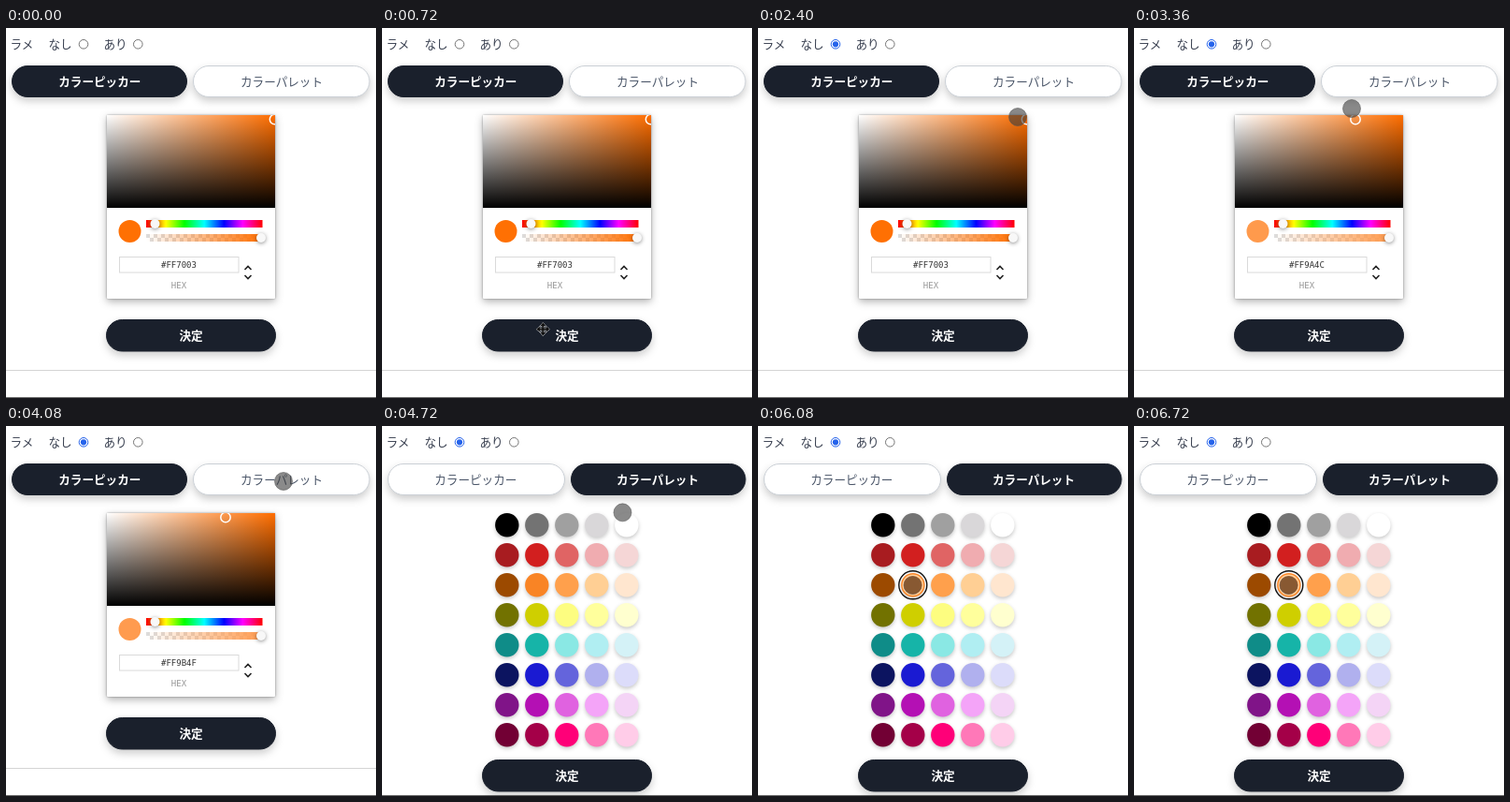
An HTML page that plays this animation: 396 px wide and 395 px high, repeating every 6.8 s.

```html
<!DOCTYPE html>
<html lang="ja">
<head>
<meta charset="utf-8">
<style>
html, body { margin: 0; width: 100%; height: 100%; overflow: hidden; background: #fff; }
svg { display: block; width: 396px; height: 395px; }
text { font: 12.6px "Noto Sans CJK JP", "Noto Sans CJK", sans-serif; fill: #3b4252; }
.mid { text-anchor: middle; }
.pill { filter: drop-shadow(0 4px 4px rgba(0,0,0,.2)); }
.pill rect { fill: #fff; stroke: #cbd0d6; }
.pill text { fill: #4a5568; }
.pill.on rect { fill: #1a202c; stroke: #1a202c; }
.pill.on text { fill: #fff; font-weight: 700; }
.radio { fill: #fff; stroke: #767676; }
.mono { font: 9px "DejaVu Sans Mono", monospace; fill: #333; }
.knob { fill: #f8f8f8; filter: drop-shadow(0 1px 2px rgba(0,0,0,.45)); }
.swatch { filter: drop-shadow(0 2px 2px rgba(0,0,0,.22)); }
</style>
</head>
<body>
<svg viewBox="0 0 396 395">
  <defs>
    <linearGradient id="white"><stop stop-color="#fff"/><stop offset="1" stop-color="#fff" stop-opacity="0"/></linearGradient>
    <linearGradient id="black" x2="0" y2="1"><stop stop-opacity="0"/><stop offset="1"/></linearGradient>
    <linearGradient id="hue">
      <stop stop-color="#f00"/><stop offset=".17" stop-color="#ff0"/><stop offset=".33" stop-color="#0f0"/>
      <stop offset=".5" stop-color="#0ff"/><stop offset=".67" stop-color="#00f"/><stop offset=".83" stop-color="#f0f"/>
      <stop offset="1" stop-color="#f00"/>
    </linearGradient>
    <linearGradient id="alpha"><stop class="tint" stop-opacity="0"/><stop class="tint" offset="1"/></linearGradient>
    <pattern id="checks" x="150" y="220" width="8" height="8" patternUnits="userSpaceOnUse">
      <path fill="#fff" d="M0 0h8v8H0z"/><path fill="#ddd" d="M0 0h4v4H0zM4 4h4v4H4z"/>
    </pattern>
    <clipPath id="field"><rect x="108" y="93" width="180" height="99"/></clipPath>
  </defs>

  <path d="M0 394.5H396" stroke="#6b6b6b"/>
  <text x="4.5" y="22">ラメ</text>
  <text x="45.5" y="22">なし</text>
  <text x="104.5" y="22">あり</text>
  <circle id="none" class="radio" cx="83" cy="17.3" r="4.8"/>
  <circle id="noneDot" cx="83" cy="17.3" r="3.1" fill="#2563eb"/>
  <circle class="radio" cx="141.3" cy="17.3" r="4.8"/>

  <g id="tabPicker" class="pill"><rect x="6.5" y="40.5" width="187" height="33" rx="16.5"/><text class="mid" x="100.3" y="61.5">カラーピッカー</text></g>
  <g id="tabPalette" class="pill"><rect x="200.5" y="40.5" width="188.5" height="33" rx="16.5"/><text class="mid" x="295" y="61.5">カラーパレット</text></g>

  <g id="picker">
    <path d="M0 365.5H396" stroke="#d4d4d4"/>
    <rect x="108" y="93" width="180" height="196" rx="1" fill="#fff" style="filter:drop-shadow(0 0 1px rgba(0,0,0,.35)) drop-shadow(0 3px 4px rgba(0,0,0,.3))"/>
    <g clip-path="url(#field)">
      <rect x="108" y="93" width="180" height="99" fill="#ff6e00"/>
      <rect x="108" y="93" width="180" height="99" fill="url(#white)"/>
      <rect x="108" y="93" width="180" height="99" fill="url(#black)"/>
      <circle id="handle" cy="97.5" r="5.2" fill="none" stroke="#fff" stroke-width="1.5"/>
    </g>
    <circle class="tint" cx="132.5" cy="217" r="12"/>
    <rect x="150" y="205" width="124.5" height="8" fill="url(#hue)"/>
    <circle class="knob" cx="159.5" cy="209" r="5"/>
    <rect x="150" y="220" width="124.5" height="8" fill="url(#checks)"/>
    <rect x="150" y="220" width="124.5" height="8" fill="url(#alpha)"/>
    <circle class="knob" cx="273" cy="224" r="5"/>
    <rect x="121.5" y="244.5" width="127.5" height="16.5" fill="#fff" stroke="#dadada"/>
    <text id="hex" class="mono mid" x="185" y="256"></text>
    <text class="mono mid" x="185" y="278" style="fill:#969696">HEX</text>
    <path d="M255.5 258l3.5-3.5 3.5 3.5M255.5 264l3.5 3.5 3.5-3.5" fill="none" stroke="#222" stroke-width="1.6"/>
  </g>

  <g id="palette"></g>
  <g id="ok" class="pill on"><rect x="107.5" y="311.5" width="181" height="33.5" rx="16.75"/><text class="mid" x="198" y="333">決定</text></g>

  <circle id="touch" r="9.5" fill="#3c3c3c" fill-opacity=".6" stroke="#555" stroke-opacity=".55"/>
  <path id="cross" d="M0-7l3 3.5H1V-1H3.500V-3L7 0 3.500 3V1H1V3.500H3L0 7-3 3.500H-1V1H-3.500V3L-7 0-3.500-3V-1H-1V-3.500H-3z" fill="#111" stroke="#fff" stroke-width=".8" paint-order="stroke"/>
</svg>
<script>
const LOOP = 6800, STEP = 80;
const CHECK = 1680, SWITCH = 4240, HOVER = 5280, SELECT = 5840;
const $ = id => document.getElementById(id);
const tints = document.querySelectorAll('.tint');

const rows = [
  '#000 #737373 #a0a0a0 #d9d7d9 #fff',
  '#a81c20 #d21f1f #e06464 #f0acb0 #f5d6d6',
  '#9c4a00 #f98425 #ffa04c #ffcf94 #ffe6cf',
  '#727200 #cfcf00 #fdfd80 #ffff9c #ffffcf',
  '#0f8c88 #16b4a8 #8ae8e4 #b0eef2 #d4f2f7',
  '#0c1460 #1a1ad2 #6464dc #b0b0ee #dcdcfa',
  '#801488 #b410b4 #e062e0 #f4a4f8 #f4d4f6',
  '#720034 #a40048 #ff0078 #ff78b8 #ffcce8'
];
const ring = (id, r, color) =>
  `<circle id="${id}" cx="165.800" cy="169.800" r="${r}" fill="none" stroke="${color}" stroke-width="1.4"/>`;
$('palette').innerHTML = rows.map((row, j) => row.split(' ').map((color, i) =>
  `<circle class="swatch" cx="${133.8 + i * 32}" cy="${105.8 + j * 32}" r="12.7" fill="${color}"/>`
).join('')).join('') + ring('hover', 10.6, '#ffd2a0') + ring('chosen', 15, '#111');

// [time, x, y]
const pointer = [
  [480, 198, 405], [1280, 79, 19], [1760, 79, 19], [2400, 278, 95], [2560, 287, 93],
  [2720, 287, 92], [3360, 233, 86], [3600, 231, 86], [4000, 297, 59], [4400, 297, 59],
  [5280, 165.5, 170], [LOOP, 165.5, 170]
];
const drag = [[0, 287.5], [2720, 287.5], [3360, 237], [3520, 235], [LOOP, 235]];
const ease = p => p * p * (3 - 2 * p);

function at(keys, t) {
  const i = keys.findIndex(k => k[0] > t);
  if (i < 1) return keys[0].slice(1);
  const a = keys[i - 1], b = keys[i];
  const p = ease((t - a[0]) / (b[0] - a[0]));
  return a.slice(1).map((v, n) => v + (b[n + 1] - v) * p);
}

const show = (id, on) => $(id).style.display = on ? '' : 'none';

function setColor(x) {
  const blue = Math.min(255, Math.max(0, Math.round(3 + (287.5 - x) * 1.446)));
  const green = Math.round(blue + (255 - blue) * .4333);
  const hex = '#' + [255, green, blue].map(v => v.toString(16).padStart(2, '0')).join('').toUpperCase();
  $('hex').textContent = hex;
  tints.forEach(el => el.setAttribute(el.tagName === 'stop' ? 'stop-color' : 'fill', hex));
  $('handle').setAttribute('cx', x);
}

function setTabs(palette) {
  show('picker', !palette);
  show('palette', palette);
  $('tabPicker').classList.toggle('on', !palette);
  $('tabPalette').classList.toggle('on', palette);
  const left = $('tabPicker').firstChild, right = $('tabPalette').firstChild;
  left.setAttribute('width', palette ? 189 : 187);
  right.setAttribute('x', palette ? 202.5 : 200.5);
  right.setAttribute('width', palette ? 186.5 : 188.5);
  $('ok').setAttribute('transform', `translate(0 ${palette ? 45 : 0})`);
}

function draw(t) {
  const [x, y] = at(pointer, t);
  for (const id of ['touch', 'cross']) $(id).setAttribute('transform', `translate(${x} ${y})`);
  show('cross', t >= 480 && t < 1600);
  show('touch', t >= 1600);
  show('noneDot', t >= CHECK);
  $('none').style.stroke = t >= CHECK ? '#2563eb' : '';
  setColor(at(drag, t)[0]);
  setTabs(t >= SWITCH);
  show('hover', t >= HOVER);
  show('chosen', t >= SELECT);
}

const start = performance.now();
function tick() {
  const t = (performance.now() - start) % LOOP;
  draw(Math.floor(t / STEP) * STEP);
  requestAnimationFrame(tick);
}
tick();
</script>
</body>
</html>
```
